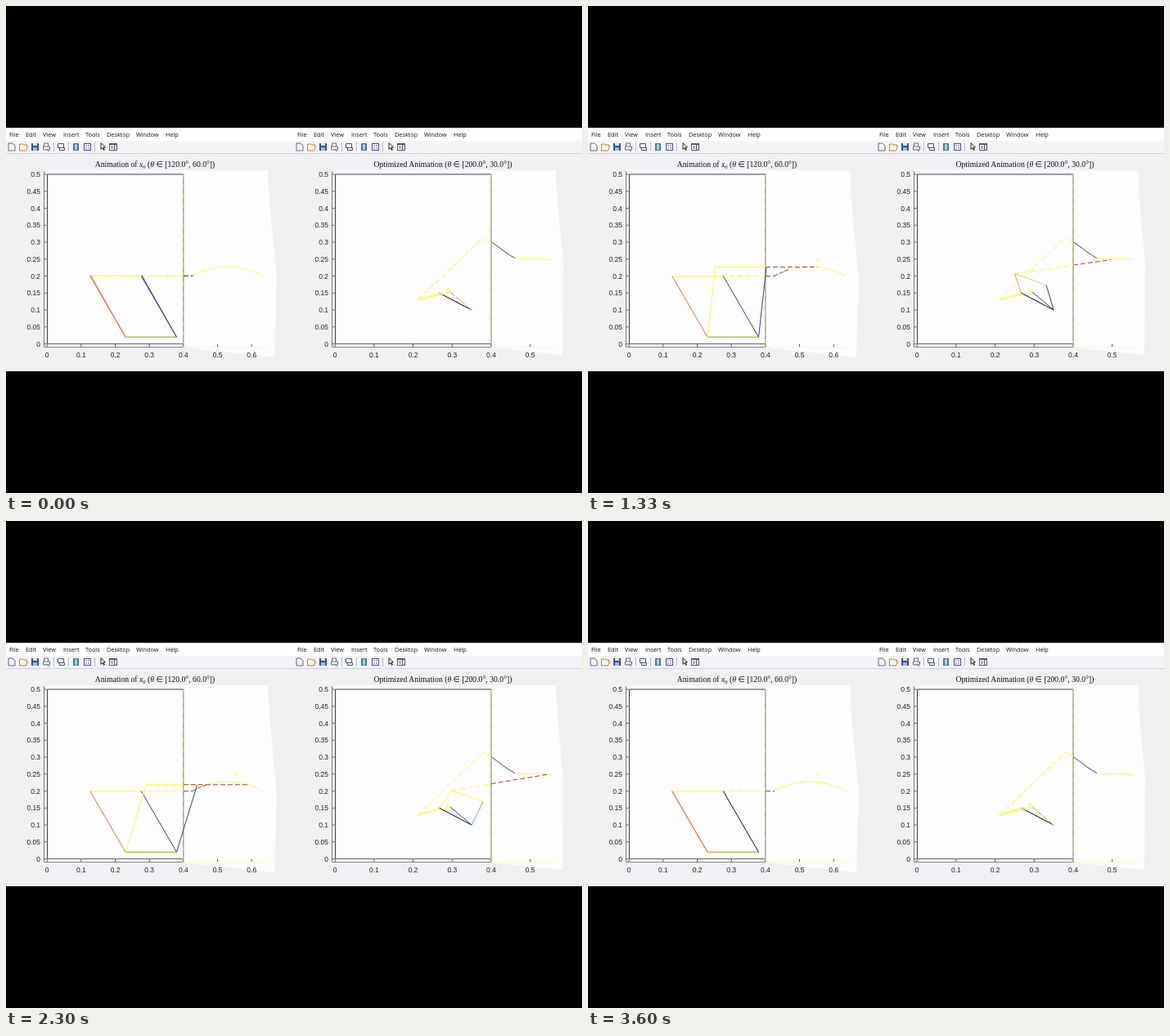
An HTML page that plays this animation: 704 by 596 pixels, repeating every 3.63 s.

```html
<!DOCTYPE html>
<html lang="en">
<head>
<meta charset="utf-8">
<title>Linkage animation</title>
<style>
  html, body { margin: 0; width: 100%; height: 100%; overflow: hidden; background: #000; }
  svg { display: block; width: 704px; height: 596px; }
  .menu { font: 7.3px "Open Sans", "Noto Sans", sans-serif; fill: #111; }
  .tick { font: 8.5px "Liberation Sans", Arial, sans-serif; fill: #222; }
  .title { font: 9.7px "Liberation Serif", "Noto Serif", serif; fill: #111; text-anchor: middle; }
  .math { font-style: italic; }
  .sub { font-size: 6.5px; }
  .mid { text-anchor: middle; }
  .end { text-anchor: end; }
  line, path, circle, .box { fill: none; stroke-width: 1; }
</style>
</head>
<body>
<svg id="stage" viewBox="0 0 704 596">
  <rect width="704" height="596" fill="#000"/>
  <rect y="149" width="704" height="298" fill="#f1f0f3"/>
  <defs>
    <g id="tools">
      <path d="M3 168h5l3 3v6h-8z" fill="#fff" stroke="#667"/>
      <circle cx="3.5" cy="169" r="1.5" fill="#f2b33c"/>
      <path d="M16.5 177v-8h4l1 1h4v2h1l-2 5z" fill="#f7d64a" stroke="#b08a20"/>
      <rect x="31" y="168" width="9" height="9" fill="#3b4fa8"/>
      <rect x="33" y="168" width="5" height="3" fill="#dfe6ff"/>
      <rect x="33" y="173" width="5" height="4" fill="#aab4d8"/>
      <path d="M46.5 172v-4h5v4M45.5 172h8v4h-8z" fill="#ddd" stroke="#667"/>
      <path d="M49 175l4 3" stroke="#778"/>
      <path d="M63.500 168.500h7v5h-7zM65.500 173.500h6v3h-6z" fill="#c3cfee" stroke="#44546f"/>
      <rect x="82" y="168" width="7" height="9" fill="#5a70a8"/>
      <rect x="84" y="169" width="3" height="7" fill="#8fe0d2"/>
      <rect x="95.500" y="168.500" width="8" height="8" fill="#fff" stroke="#454a91"/>
      <path d="M97 171h2M100 171h2M97 174h2M100 174h2" stroke="#6550a8"/>
      <path d="M116 167.500v8l2-2 1.500 3 1-.5-1.500-3h2.500z" fill="#fff" stroke="#222" stroke-width=".8"/>
      <rect x="126.500" y="168.500" width="9" height="8" fill="#fff" stroke="#556"/>
      <path d="M127 169.500h8M132.500 170v6M128 172h3M128 174h3" stroke="#556"/>
      <path d="M58.500 167v11M76.500 167v11M108.500 167v11" stroke="#b9b9cc"/>
      <path d="M345 155l4 1v2l-3-1z" fill="#222"/>
    </g>
  </defs>
</svg>
<script>
const stage = document.getElementById('stage');
const YELLOW = '#fff94e', NAVY = '#3d3a85', RED = '#a8433a', ORANGE = '#e5703a',
      GREEN = '#a9ee6a', TEAL = '#4fc39a', DARK = '#3b3b48';

function add(tag, attrs, text) {
  const el = document.createElementNS('http://www.w3.org/2000/svg', tag);
  set(el, attrs);
  if (text !== undefined) el.textContent = text;
  return stage.appendChild(el);
}
function set(el, attrs) {
  for (const name in attrs) el.setAttribute(name, attrs[name]);
}
const label = (x, y, cls, text) => add('text', { x, y, class: cls }, text);
const path = (d, stroke, dash = 'none') => add('path', { d, stroke, 'stroke-dasharray': dash });
const polar = (p, r, deg) => [p[0] + r * Math.cos(deg * Math.PI / 180), p[1] + r * Math.sin(deg * Math.PI / 180)];
const mix = (p, q, f) => [p[0] + (q[0] - p[0]) * f, p[1] + (q[1] - p[1]) * f];

function chrome(left) {
  add('rect', { x: left, y: 149, width: 352, height: 16, fill: '#fff' });
  add('rect', { x: left, y: 165, width: 352, height: 15, fill: '#f5f4f6' });
  path(`M${left} 180.5h352`, '#cfcfe6');
  const menu = { File: 4, Edit: 24, View: 45, Insert: 70, Tools: 97, Desktop: 123, Window: 159, Help: 195 };
  for (const name in menu) label(left + menu[name], 159.5, 'menu', name);
  add('use', { href: '#tools', x: left });
}

function axes(left, scale, lastTick, area) {
  add('polygon', { points: area, fill: '#fdfdff' });
  const x = u => left + 50.2 + scale * u, y = v => 413.5 - 415 * v;
  const edge = x(.4), ax = left + 46.5;
  for (let i = 0; i <= 10; i++) {
    const v = i / 20;
    label(left + 42, y(v) + 3, 'tick end', String(v));
    path(`M${ax} ${y(v)}h3`, '#555');
  }
  for (let i = 0; i <= lastTick; i++) {
    label(x(i / 10), 430, 'tick mid', String(i / 10));
    path(`M${x(i / 10)} 417v-3`, '#555');
  }
  path(`M${ax} 202V417.5`, '#77777f');
  path(`M${ax} 417.5H${edge}`, '#85809a');
  path(`M${edge} 417.5H${left + 320}`, '#fffbb0');
  path(`M${left + 50.5} 413.5V206H${edge}`, DARK);
  path(`M${left + 50.5} 413.5H${edge}`, '#66664a');
  path(`M${edge} 206V413.5`, '#77773f');
  path(`M${edge} 206V413.5`, '#d8dc50', '5 7');
  return { x, y };
}

function title(x, words, range) {
  const t = label(x, 197, 'title', '');
  t.innerHTML = `${words} (<tspan class="math">θ</tspan> ∈ [${range}])`;
}

// A movable straight line between two points in plot units.
function bar(plot, stroke, dash) {
  const el = path('', stroke, dash);
  return (p, q, color) => {
    set(el, { d: `M${plot.x(p[0])} ${plot.y(p[1])}L${plot.x(q[0])} ${plot.y(q[1])}` });
    if (color) set(el, { stroke: color });
  };
}

// Dashed arm: bright inside the box, dark beyond its right side.
function arm(plot) {
  const inside = bar(plot, YELLOW, '7 3'), outside = bar(plot, RED, '6 3');
  return (p, q) => {
    const cut = mix(p, q, Math.min(1, (.4 - p[0]) / (q[0] - p[0])));
    inside(p, cut);
    outside(cut, q);
  };
}

function ring(plot, stroke) {
  const el = add('circle', { r: 2, stroke });
  return (p, show = true) => set(el, { cx: plot.x(p[0]), cy: plot.y(p[1]), visibility: show ? 'visible' : 'hidden' });
}

function cross(a, b, c, d) {
  const u = [b[0] - a[0], b[1] - a[1]], v = [d[0] - c[0], d[1] - c[1]];
  const f = ((c[0] - a[0]) * v[1] - (c[1] - a[1]) * v[0]) / (u[0] * v[1] - u[1] * v[0]);
  return mix(a, b, f);
}

function parallelPose(deg) {
  const a = [.23, .02], b = [.38, .02];
  const tip = polar(a, .2078, deg);
  return { a, b, tip, joint: polar(b, .2078, deg), end: [tip[0] + .3, tip[1]] };
}

function fourBarPose(deg) {
  const a = [.267, .15], b = [.35, .1], coupler = .088, rocker = .076;
  const tip = polar(a, .06, deg);
  const dx = b[0] - tip[0], dy = b[1] - tip[1], d = Math.hypot(dx, dy);
  const along = (d * d + coupler ** 2 - rocker ** 2) / (2 * d);
  const off = Math.sqrt(Math.max(0, coupler ** 2 - along ** 2));
  const joint = [tip[0] + (dx * along - dy * off) / d, tip[1] + (dy * along + dx * off) / d];
  const tilt = Math.atan2(joint[1] - tip[1], joint[0] - tip[0]) * 180 / Math.PI;
  return { a, b, tip, joint, end: polar(tip, .25, tilt + 32) };
}

function linkage(plot, ground) {
  const base = bar(plot, ground), link = bar(plot, YELLOW), reach = arm(plot),
        crank = bar(plot, YELLOW), rocker = bar(plot, NAVY);
  return (pose, c = {}) => {
    base(pose.a, pose.b);
    link(pose.tip, pose.joint, c.link);
    reach(pose.tip, pose.end);
    crank(pose.a, pose.tip, c.crank);
    rocker(pose.b, pose.joint, c.rocker);
  };
}

chrome(0);
chrome(352);
const left = axes(0, 416.7, 6, '46,201 320,201 322,240 331,333 328,430 218,418 46,418');
const right = axes(352, 477, 5, '398,201 672,201 674,240 681,315 680,427 593,418 398,418');
title(182, 'Animation of <tspan class="math">x</tspan><tspan class="sub" dy="1.5">0</tspan><tspan dy="-1.5"> </tspan>', '120.0°, 60.0°');
title(534, 'Optimized Animation', '200.0°, 30.0°');

// Paths of the end points, then the resting poses.
let trace = '';
for (let deg = 120; deg >= 60; deg -= 2) {
  const { end } = parallelPose(deg);
  trace += (trace ? 'L' : 'M') + left.x(end[0]) + ' ' + left.y(end[1]);
}
path(trace, YELLOW, '9 1.5');
const traceStart = path(trace, '#70404a', '5 2 5 2 5 200');
path('M586 284.5L594 289', YELLOW);
path('M593 288.500L610 301Q617 306 622 308.500', '#4a4a55');
path('M622 308.500Q628 310 633 309.500Q650 308 667 310.500', YELLOW);

linkage(left, '#b5b23c')(parallelPose(120), { crank: ORANGE });
linkage(right, DARK)(fourBarPose(200));

const moveLeft = linkage(left, '#c2bb45'), moveRight = linkage(right, DARK);
const target = ring(left, '#fffa9a'), start = ring(right, YELLOW);
const pole = ring(right, '#fff78a'), groundPole = ring(right, '#bdf3d2');
start([.291, .158]);

function swing(step, low, high, rate, turn) {
  return Math.min(high, low + rate * Math.abs(step - turn));
}
function inView(p) {
  return p[0] > 0 && p[0] < .56 && p[1] > 0 && p[1] < .5;
}

function draw(now) {
  const t = now % 3630;
  const step = t < 430 ? 0 : Math.min(96, Math.floor((t - 427) / 33.37) + 1);
  const degL = swing(step, 60, 120, 1.27, 46.7);
  const degR = swing(step, 30, 200, 3.65, 49);

  moveLeft(parallelPose(degL), { crank: degL > 92 ? ORANGE : YELLOW });
  set(traceStart, { visibility: degL < 115 ? 'visible' : 'hidden' });
  target([.553, .25], step > 0);

  const pose = fourBarPose(degR);
  moveRight(pose, {
    link: degR < 120 && degR > 75 ? GREEN : YELLOW,
    crank: degR > 80 && degR < 190 ? '#eda545' : YELLOW,
    rocker: degR > 190 ? YELLOW : degR > 85 ? NAVY : TEAL
  });
  const p = cross(pose.a, pose.tip, pose.b, pose.joint);
  const g = cross(pose.a, pose.b, pose.tip, pose.joint);
  pole(p, inView(p));
  groundPole(g, inView(g));
  requestAnimationFrame(loop);
}
const begin = performance.now();
function loop() { draw(performance.now() - begin); }
loop();
</script>
</body>
</html>
```
